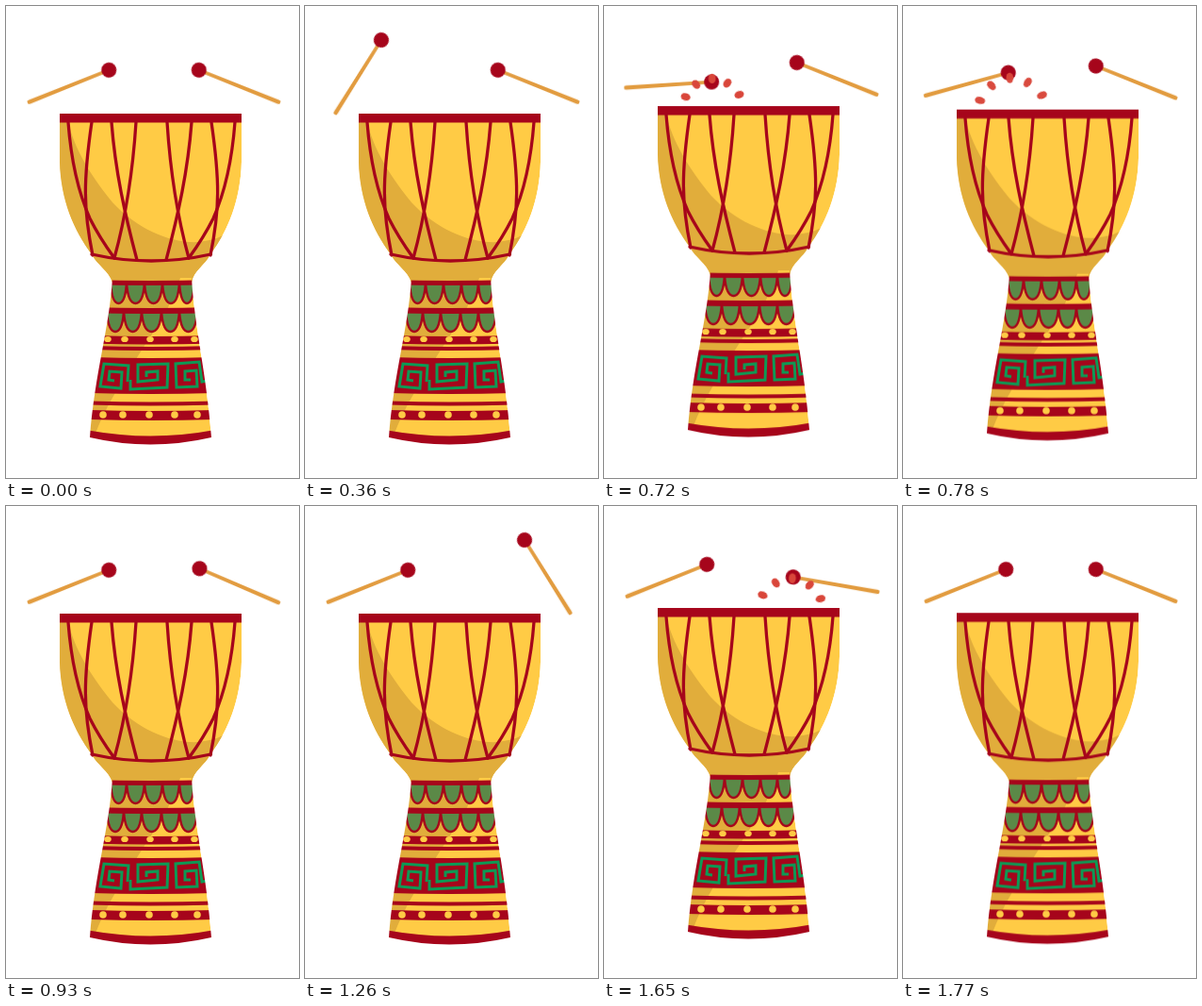
An HTML page for the animation above (1800 ms loop, 311x500 px).

```html
<!DOCTYPE html>
<html lang="en">
<head>
<meta charset="utf-8">
<title>Drum</title>
<style>
  html, body { margin: 0; width: 100%; height: 100%; overflow: hidden; background: #fff; }
  svg { display: block; width: 100vw; height: 100vh; }

  .red { fill: #a6051b; }
  .gold { fill: #ffcb45; }
  .shade { fill: #e1ad3b; }
  .rope { fill: none; stroke: #a6051b; stroke-width: 3.3; stroke-linecap: round; }
  .scallop { fill: #5b8947; stroke: #a6051b; stroke-width: 2.5; }
  .meander { fill: none; stroke: #0d9a55; stroke-width: 3; }
  .wood { fill: #e29c40; }

  .scene { animation: bounce 900ms infinite; }
  .stick { animation: swing 1800ms infinite cubic-bezier(.333, 0, .667, 1); }
  .spark { fill: #d9463a; opacity: 0; animation: burst 1800ms linear infinite; }
  .right .stick, .right .spark { animation-delay: -900ms; }

  @keyframes bounce {
    0%, 70% { transform: translateY(0); }
    73.33% { transform: translateY(.6px); animation-timing-function: ease-out; }
    80% { transform: translateY(-8px); animation-timing-function: cubic-bezier(.25, .4, .6, .8); }
    100% { transform: translateY(0); }
  }
  @keyframes swing {
    0%, 47.2%, 100% { transform: translate(45.2px, 93.5px) rotate(-21.8deg); }
    14.4% { transform: translate(44.3px, 94.5px) rotate(-57.9deg); }
    25% {
      transform: translate(44.3px, 94.5px) rotate(-57.9deg);
      animation-timing-function: cubic-bezier(.5, 0, .8, .7);
    }
    33.33% { transform: translate(45.5px, 92.5px) rotate(12.7deg); }
  }
  @keyframes burst {
    0%, 33.32% { opacity: 0; transform: rotate(var(--a)) translateY(calc(var(--r) * -21px)); }
    33.33% { opacity: 1; transform: rotate(var(--a)) translateY(calc(var(--r) * -21px)) scale(.85); }
    36.67% { opacity: 1; transform: rotate(var(--a)) translateY(calc(var(--r) * -23.5px)) scale(.92, 1.1); }
    43.33% { opacity: 1; transform: rotate(calc(var(--a) - 5deg)) translateY(calc(var(--r) * -32.5px)) scale(.86, 1.25); }
    46.5%, 100% { opacity: 0; transform: rotate(calc(var(--a) - 6deg)) translateY(calc(var(--r) * -36px)) scale(.8, 1.25); }
  }
</style>
</head>
<body>
<svg viewBox="0 0 311 500">
  <defs>
    <path id="bowl" d="M57 118V165C58 205 72 238 91 263C97 275 109 280 113 293H197C199 280 211 275 217 263C236 238 249 205 250 165V118Z"/>
    <path id="base" d="M113 288C110 340 94 390 89 457Q153 472 218 457C213 390 200 340 197 288Z"/>
    <clipPath id="inBowl"><use href="#bowl"/></clipPath>
    <clipPath id="inBase"><use href="#base"/></clipPath>
    <g id="ropes" class="rope">
      <path d="M66 123C69 163 77 198 89 225Q99 245 115 267"/>
      <path d="M91 123C82 185 82 215 92 264"/>
      <path d="M112 123C116 175 126 220 139 269"/>
      <path d="M138 123C135 170 128 220 115 267"/>
    </g>
    <g id="beater">
      <g class="stick">
        <path class="wood" d="M-22 -2.2L69 -1.8V1.8L-22 2.2A2.2 2.2 0 0 1 -22 -2.2Z"/>
        <circle class="red" cx="69" r="8"/>
      </g>
      <g class="sparks" transform="translate(115 112)"></g>
    </g>
  </defs>

  <g class="scene">
    <g clip-path="url(#inBowl)">
      <use href="#bowl" class="gold"/>
      <path class="shade" d="M50 118H65C70 145 86 175 113 208C139 236 175 252 205 250Q225 248 244 236V293H50Z"/>
    </g>
    <use href="#ropes"/>
    <use href="#ropes" transform="matrix(-1 0 0 1 309 0)"/>
    <path class="rope" d="M91 263Q154 277 217.5 263"/>
    <rect class="red" x="57" y="114" width="193" height="9.5"/>

    <g clip-path="url(#inBase)">
      <use href="#base" class="gold"/>
      <path class="shade" d="M80 465H91C102 428 125 395 150 355Q175 320 185 288H80Z"/>
      <g id="scallops"></g>
      <g id="bands" class="red"></g>
      <path class="red" d="M85 449Q153 462 222 449V475H85Z"/>
      <g id="studs" class="gold"></g>
      <g class="meander">
        <path d="M129 398L130 381L104 379L100 403L122 405L123 388L110 387L109 396L115 397"/>
        <path d="M132 396V406L171 404L172 379L140 380V398L161 396V387L149 388V393"/>
        <path d="M214 397L208 398L205 377L180 379L181 404L203 403L202 386L190 387V396L196 396"/>
      </g>
    </g>

    <g class="left"></g>
    <g class="right" transform="matrix(-1 0 0 1 314 0)"></g>
  </g>
</svg>
<script>
  const NS = 'http://www.w3.org/2000/svg';
  const $ = s => document.querySelector(s);

  function add(parent, tag, attrs) {
    const el = document.createElementNS(NS, tag);
    for (const key in attrs) el.setAttribute(key, attrs[key]);
    return parent.appendChild(el);
  }

  function scallopRow(top, edges) {
    edges.slice(1).forEach((x, i) => {
      const l = edges[i], w = x - l;
      add($('#scallops'), 'path', {
        class: 'scallop',
        d: `M${l} ${top}C${l + 1} ${top + 13} ${l + w * .2} ${top + 21} ${l + w / 2} ${top + 21}S${x - 1} ${top + 13} ${x} ${top}Z`
      });
    });
  }
  scallopRow(294, [111, 128, 147, 166, 184, 200]);
  scallopRow(324, [107, 125, 144, 165, 184, 203]);

  // Each band: top edge and height
  [[290, 5], [319, 6], [349, 8.5], [360, 4], [372, 38], [418.5, 4], [428, 10]].forEach(([y, h]) =>
    add($('#bands'), 'path', { d: `M85 ${y}Q153 ${y + 2} 222 ${y}V${y + h}Q153 ${y + h + 2} 85 ${y + h}Z` }));

  const studRow = (y, ry, xs) => xs.forEach(cx =>
    add($('#studs'), 'ellipse', { cx, cy: y, rx: 3.8, ry }));
  studRow(353, 3.1, [108, 126, 153, 179, 200]);
  studRow(433, 3.8, [103, 124, 152, 179, 203]);

  // Angle and relative reach of every spark
  [[-72, 1.05], [-37, .97], [2, .97], [38, .98], [73, 1.08]].forEach(([a, r]) =>
    add($('.sparks'), 'circle', { class: 'spark', r: 4.4, style: `--a:${a}deg;--r:${r}` }));

  for (const side of ['.left', '.right'])
    for (const part of $('#beater').children) $(side).append(part.cloneNode(true));
</script>
</body>
</html>
```
